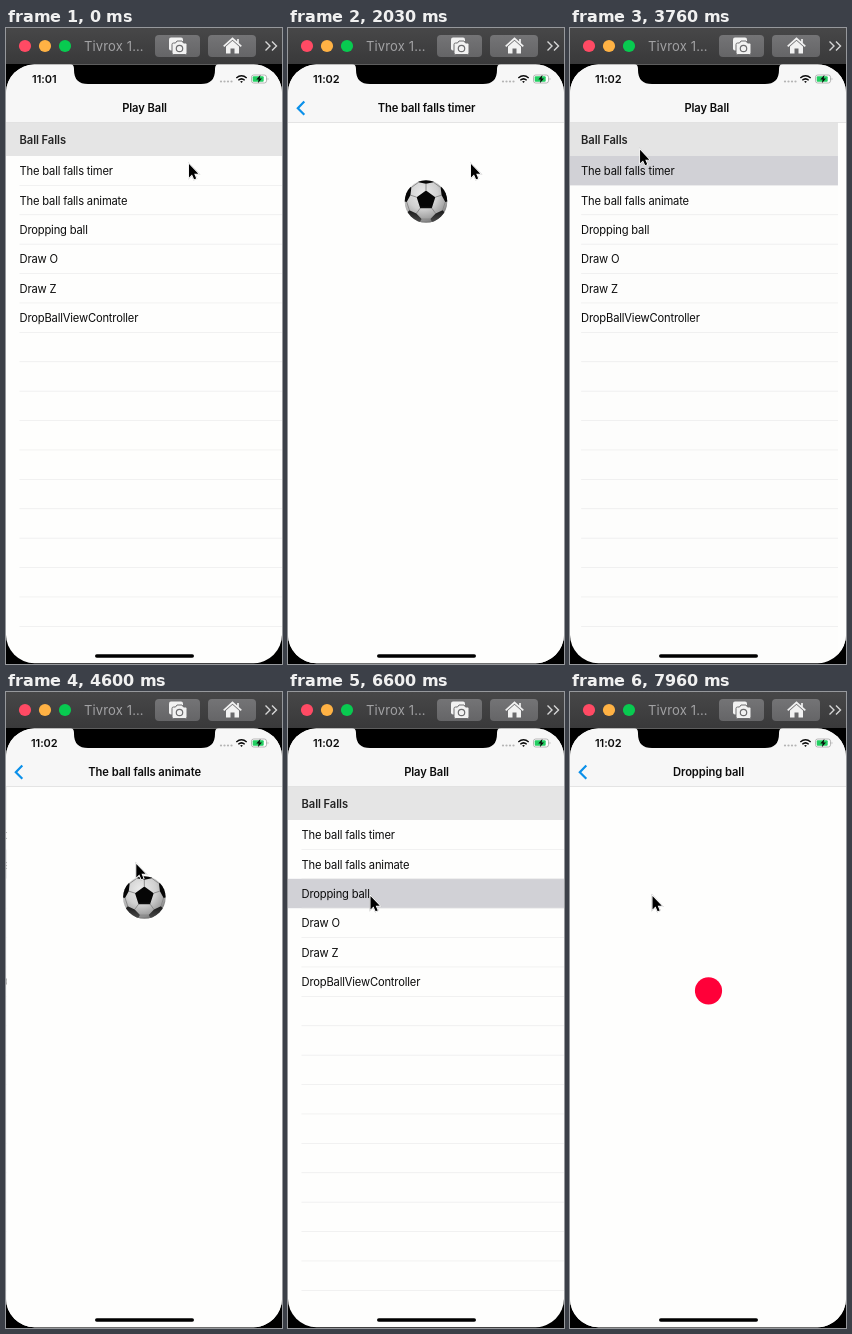
Animation of 276 by 636 pixels, one loop 8000 ms. Source, as an HTML page:

```html
<!DOCTYPE html>
<html lang="en">
<head>
<meta charset="utf-8">
<title>Play Ball</title>
<style>
html, body { margin: 0; width: 100%; height: 100%; overflow: hidden; background: #000; }
svg { display: block; width: 100vw; height: 100vh; }
text { font: 11.2px Inter, sans-serif; letter-spacing: -.18px; fill: #0b0b0b; }
.bold { font-weight: 600; letter-spacing: -.08px; }
.mid { text-anchor: middle; }
#clock { font-size: 11px; letter-spacing: -.05px; }
#device { font-size: 13px; letter-spacing: .15px; fill: #a2a2a4; }
#cursor { filter: drop-shadow(0 .6px .7px #0007); }
</style>
</head>
<body>
<svg viewBox="0 0 276 636">
  <defs>
    <linearGradient id="bar" x2="0" y2="1">
      <stop stop-color="#474748"/><stop offset="1" stop-color="#39393a"/>
    </linearGradient>
    <linearGradient id="key" x2="0" y2="1">
      <stop stop-color="#747476"/><stop offset="1" stop-color="#656567"/>
    </linearGradient>
    <radialGradient id="leather" cx=".42" cy=".32" r=".72">
      <stop stop-color="#ececec"/><stop offset=".5" stop-color="#d0d0d0"/>
      <stop offset=".82" stop-color="#a0a0a0"/><stop offset="1" stop-color="#626262"/>
    </radialGradient>
    <linearGradient id="patch" gradientUnits="userSpaceOnUse" x1="0" y1="-21" x2="0" y2="21">
      <stop offset=".6" stop-color="#060606"/><stop offset="1" stop-color="#4c4c4c"/>
    </linearGradient>
    <clipPath id="screen"><rect y="36.5" width="276" height="598.7" rx="28.5"/></clipPath>
    <clipPath id="round"><circle r="21.3"/></clipPath>
  </defs>

  <rect width="276" height="636"/>
  <rect width="276" height="36" fill="url(#bar)"/>
  <circle cx="19" cy="18" r="6.1" fill="#ff4a64"/>
  <circle cx="39" cy="18" r="6.1" fill="#ffb244"/>
  <circle cx="59" cy="18" r="6.1" fill="#08ca50"/>
  <text id="device" x="78" y="22.8">Tivrox 1…</text>
  <rect x="149" y="7" width="45" height="22" rx="4" fill="url(#key)"/>
  <rect x="202" y="7" width="48" height="22" rx="4" fill="url(#key)"/>
  <g fill="#f2f2f2">
    <rect x="163" y="9.5" width="14" height="13" rx="2"/>
    <path d="M166 16.5q0-1.5 1.5-1.5h2l1.5-2h5l1.5 2h2q1.5 0 1.5 1.5v8.5q0 1.5-1.5 1.5h-12q-1.5 0-1.5-1.5z" stroke="#6c6c6e"/>
    <circle cx="173.5" cy="20.5" r="3.2" fill="none" stroke="#6c6c6e" stroke-width="1.2"/>
    <path d="M217.7 18.3L226.5 10.5L235.3 18.3M232 11v4" fill="none" stroke="#f2f2f2" stroke-width="1.7"/>
    <path d="M220 18.5L226.5 12.8L233 18.5V25.5H228.5V20.5H224.5V25.5H220z"/>
  </g>
  <path d="M259.5 13.5l4.5 4.5l-4.5 4.5M266 13.5l4.5 4.5l-4.5 4.5" fill="none" stroke="#d6d6d6" stroke-width="1.4"/>

  <g clip-path="url(#screen)">
    <rect y="36" width="276" height="600" fill="#fefefd"/>
    <g id="list">
      <rect id="glow" width="276" height="29.4" fill="#d1d1d6"/>
      <rect y="94.5" width="276" height="33.5" fill="#e5e5e5"/>
      <text class="bold" x="13.5" y="115.5" style="fill:#232323">Ball Falls</text>
    </g>
    <rect id="dim" y="94" width="276" height="542"/>
    <g id="detail">
      <rect y="94" width="276" height="542" fill="#fefefd"/>
      <g id="ball"><circle r="21.3" fill="url(#leather)"/><g id="panels" clip-path="url(#round)"/></g>
      <circle id="dot" cx="138.5" r="13.6" fill="#ff0039"/>
    </g>
    <rect y="36" width="276" height="58.5" fill="#f7f7f7"/>
    <rect y="94" width="276" height=".7" fill="#dcdcdc"/>
    <text id="home" class="bold mid" y="84">Play Ball</text>
    <text id="title" class="bold mid" y="84"></text>
    <path id="back" d="M16.3 73.6L9.8 80.2L16.3 86.8" fill="none" stroke="#0a90ea" stroke-width="2.2"/>
    <path d="M64 36q4 0 4 5v1q0 14 14 14h113q14 0 14-14v-1q0-5 4-5z"/>
    <text id="clock" class="bold mid" x="38.3" y="55"></text>
    <g fill="#b4b4b4">
      <circle cx="215" cy="53.5" r="1.1"/><circle cx="218.5" cy="53.5" r="1.1"/>
      <circle cx="222" cy="53.5" r="1.1"/><circle cx="225.5" cy="53.5" r="1.1"/>
    </g>
    <g fill="none" stroke="#0b0b0b" stroke-width="1.5">
      <path d="M230.3 50q5.2-4.4 10.4 0M232.3 52.2q3.2-2.7 6.4 0"/>
      <path d="M235.5 55l-1.4-1.5q1.4-1 2.8 0z" fill="#0b0b0b" stroke="none"/>
    </g>
    <rect x="245.5" y="47" width="15" height="8" rx="2.2" fill="#fff" stroke="#a4a4a4" stroke-width=".8"/>
    <rect x="246.7" y="48.2" width="11" height="5.6" rx="1" fill="#23cf62"/>
    <path d="M261.7 49.5q1.6 1.5 0 3z" fill="#a4a4a4"/>
    <path d="M254.5 46.8l-4.2 4.7h2.4l-.9 3.8l4.2-4.8h-2.4z" fill="#0b0b0b"/>
    <rect x="89" y="626.3" width="99" height="3.5" rx="1.75"/>
  </g>
  <path id="cursor" d="M0 0V13.4L3 10.6L5.1 15.3L7.2 14.4L5.2 9.8H9.3Z" stroke="#fff" stroke-width="1.8" paint-order="stroke"/>
</svg>
<script>
const LOOP = 8000, ROW = 29.4, TOP = 128, HIGH = 173.5;
const $ = id => document.getElementById(id);
const clamp = v => Math.max(0, Math.min(1, v));
const span = (t, a, b) => clamp((t - a) / (b - a));
const mix = (a, b, p) => a + (b - a) * p;
const wave = p => (1 - Math.cos(Math.PI * p)) / 2;
const settle = p => 1 - (1 - p) ** 4;

function add(parent, tag, attrs, text = '') {
  const el = document.createElementNS('http://www.w3.org/2000/svg', tag);
  for (const k in attrs) el.setAttribute(k, attrs[k]);
  el.textContent = text;
  parent.appendChild(el);
}

function buildList() {
  const names = ['The ball falls timer', 'The ball falls animate', 'Dropping ball',
    'Draw O', 'Draw Z', 'DropBallViewController'];
  for (let i = 0; i < 16; i++) {
    const y = TOP + ROW * i;
    add($('list'), 'rect', { x: 13.5, y: y + ROW - .4, width: 263, height: .7, fill: '#ececec' });
    if (names[i]) add($('list'), 'text', { x: 13.5, y: y + 19.2 }, names[i]);
  }
}

// Five outer panels around a central pentagon, joined by seams.
function buildBall() {
  const at = (r, deg) => {
    const a = deg * Math.PI / 180;
    return `${(21.3 * r * Math.cos(a)).toFixed(2)} ${(-1.3 + 21.3 * r * Math.sin(a)).toFixed(2)}`;
  };
  let core = [], outer = '', seams = '';
  for (let a = -90; a < 270; a += 72) {
    core.push(at(.46, a));
    outer += `M${at(.77, a)}L${at(.91, a + 23)}L${at(1.25, a + 18)}L${at(1.25, a - 18)}L${at(.91, a - 23)}Z`;
    seams += `M${at(.46, a)}L${at(.77, a)}M${at(.91, a + 23)}L${at(.91, a + 49)}`;
  }
  add($('panels'), 'path', { d: seams, fill: 'none', stroke: '#868686', 'stroke-width': .9 });
  add($('panels'), 'path', { d: `M${core.join('L')}Z${outer}`, fill: 'url(#patch)' });
}

// 0 shows the list, 1 shows the detail page
function pageAt(t) {
  const go = start => settle(span(t, start, start + 450));
  if (t < 3300) return go(435);
  if (t < 4200) return 1 - go(3497);
  if (t < 5880) return go(4235);
  if (t < 6600) return 1 - go(5890);
  return go(6635);
}

function glowAt(t) {
  if (t < 4230) return [0, t < 430 ? 0 : 1 - span(t, 3750, 4050)];
  if (t < 6560) return [1, 1 - span(t, 6140, 6440)];
  return [2, 1];
}

function cursorAt(t) {
  const moves = [
    [3030, 3420, 9, 71],
    [3520, 4000, 130.3, 172],
    [5350, 5825, 6, 82],
    [6000, 6550, 82.5, 204]
  ];
  let x = 183, y = 136;
  for (const [a, b, tx, ty] of moves) {
    const p = wave(span(t, a, b));
    x = mix(x, tx, p);
    y = mix(y, ty, p);
  }
  return [x, y];
}

const upDown = (t, start, time) => 1 - Math.abs(1 - 2 * span(t, start, start + 2 * time));

function ballAt(t) {
  return t < 4200
    ? mix(HIGH, 601, upDown(t, 550, 740))
    : mix(HIGH, 613.5, wave(upDown(t, 4484, 673)));
}

function dotAt(t) {
  const hit = 7330, floor = 622;
  if (t < hit) return mix(110, floor, span(t, 6800, hit) ** 2);
  const s = (t - hit) / 1000;
  return floor - 733 * s + 350 * s * s;
}

const put = (id, name, value) => $(id).setAttribute(name, value);
const move = (id, x, y) => put(id, 'transform', `translate(${x.toFixed(2)} ${y.toFixed(2)})`);

function draw(t) {
  const p = pageAt(t), [row, glow] = glowAt(t), last = t >= 6560;
  move('list', -83 * p, 0);
  move('detail', 276 * (1 - p), 0);
  put('dim', 'opacity', .08 * p);
  put('glow', 'y', TOP + ROW * row);
  put('glow', 'opacity', glow);
  put('home', 'x', 138.5 - 60 * p);
  put('home', 'opacity', clamp(1.1 - 1.6 * p));
  put('title', 'x', 138.5 + 100 * (1 - p));
  put('title', 'opacity', span(p, .3, .97));
  put('back', 'opacity', span(p, .1, .95));
  $('title').textContent = last ? 'Dropping ball' : 'The ball falls ' + (t < 4200 ? 'timer' : 'animate');
  $('clock').textContent = t < 1500 ? '11:01' : '11:02';
  put('ball', 'visibility', last ? 'hidden' : 'visible');
  put('dot', 'visibility', last ? 'visible' : 'hidden');
  move('ball', 138, ballAt(t));
  put('dot', 'cy', dotAt(t));
  move('cursor', ...cursorAt(t));
}

function tick() {
  draw(performance.now() % LOOP);
  requestAnimationFrame(tick);
}

buildList();
buildBall();
tick();
</script>
</body>
</html>
```
